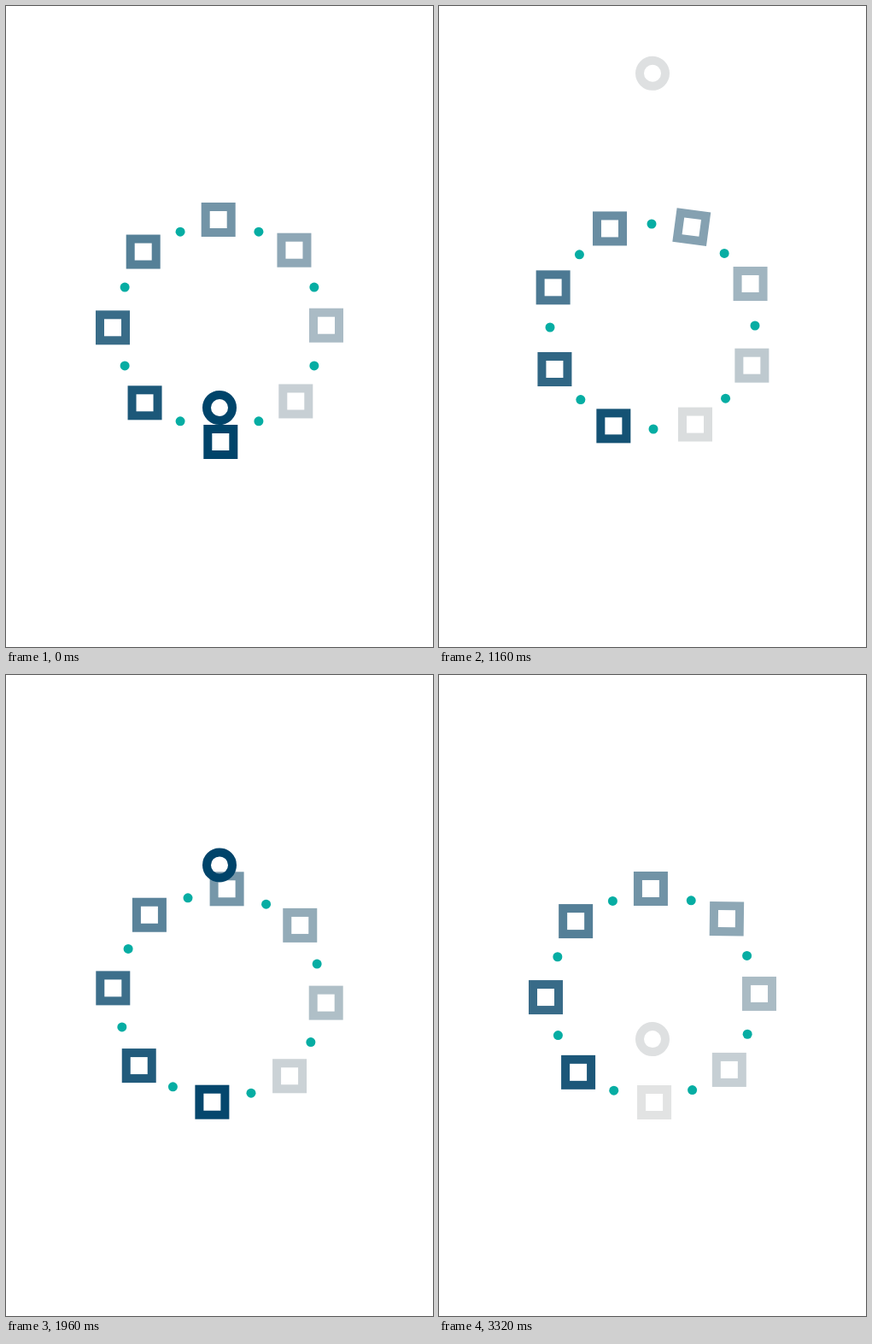
Write an HTML page that moves like this. It is 500 px wide and 750 px high and loops after 3360 ms.

```html
<!DOCTYPE html>
<html lang="en">
<head>
<meta charset="utf-8">
<title>Bouncing ball loader</title>
<style>
  html, body { margin: 0; width: 100%; height: 100%; overflow: hidden; background: #fff; }
  svg { display: block; width: 100%; height: 100%; }
</style>
</head>
<body>
<svg id="stage" viewBox="0 0 500 750"></svg>
<script>
const PERIOD = 1680, STEP = 40, COUNT = 8;
const DARK = [0, 68, 106], LIGHT = [227, 227, 227];
const APEX = 574, TOP_HIT = 755, PEAK = 1220, BOTTOM_HIT = 1660;

// Ring rotation: time, degrees, degrees per ms
const SPIN = [
  [0, 0, .009], [280, 4.55, .013], [800, 11.44, .0245], [1160, 22.02, .041],
  [1440, 37, .054], [1640, 44.65, .016], [PERIOD, 45, .006]
];

const stage = document.getElementById('stage');

function add(tag, attrs) {
  const node = document.createElementNS('http://www.w3.org/2000/svg', tag);
  set(node, attrs);
  stage.appendChild(node);
  return node;
}

function set(node, attrs) {
  for (const key in attrs) node.setAttribute(key, attrs[key]);
}

const each = make => Array.from({ length: COUNT }, make);
const dots = each(() => add('circle', { r: 5.5, fill: '#06ada3' }));
const squares = each(() => add('rect', {
  x: -15, y: -15, width: 30, height: 30, fill: 'none', 'stroke-width': 10
}));
const ball = add('circle', { cx: 250, r: 15, fill: 'none', 'stroke-width': 10 });

const clamp = x => Math.min(1, Math.max(0, x));
const mix = (a, b, x) => a + (b - a) * x;
const easeOut = (x, power) => 1 - Math.pow(1 - clamp(x), power);
const shade = x => `rgb(${DARK.map((c, i) => Math.round(mix(c, LIGHT[i], x)))})`;

function spinAt(t) {
  const i = SPIN.findIndex(key => key[0] > t);
  const [t0, a0, v0] = SPIN[i - 1], [t1, a1, v1] = SPIN[i];
  const span = t1 - t0, x = (t - t0) / span, y = 1 - x;
  return a0 * (1 + 2 * x) * y * y + v0 * span * x * y * y
       + a1 * (3 - 2 * x) * x * x - v1 * span * x * x * y;
}

function onRing(degrees, radius) {
  const a = degrees * Math.PI / 180;
  return [250 - radius * Math.sin(a), 375 + radius * Math.cos(a)];
}

function ballY(t) {
  if (t < APEX) return mix(470, 184, easeOut(t / APEX, 3));
  if (t < TOP_HIT) return mix(184, 212, ((t - APEX) / (TOP_HIT - APEX)) ** 2);
  if (t < PEAK) return mix(212, 78.5, easeOut((t - TOP_HIT) / (PEAK - TOP_HIT), 3));
  if (t < BOTTOM_HIT) return mix(78.5, 460, ((t - PEAK) / (BOTTOM_HIT - PEAK)) ** 2);
  return mix(460, 470, (t - BOTTOM_HIT) / (PERIOD - BOTTOM_HIT));
}

// Offset and tilt of a square that the ball has struck
function recoil(index, t) {
  if (index === 0) return [0, 10 * (1 - clamp(t / 200)) ** 2, 0];
  const u = t - TOP_HIT;
  if (index !== 4 || u < 0) return [0, 0, 0];
  return [
    .118 * u * Math.exp(-.0142 * u),
    .38 * u * Math.exp(-.0265 * u),
    -53.2 * Math.exp(-.0037 * u) * Math.sin(.0138 * u)
  ];
}

function draw(time) {
  const t = Math.floor(time / STEP) * STEP % PERIOD;
  const spin = spinAt(t);

  dots.forEach((dot, i) => {
    const [cx, cy] = onRing(i * 45 + 22.5 + spin, 120);
    set(dot, { cx, cy });
  });

  squares.forEach((square, i) => {
    const [x, y] = onRing(i * 45 + spin - .6, 125);
    const [dx, dy, tilt] = recoil(i, t);
    set(square, {
      transform: `translate(${x + dx} ${y + dy}) rotate(${tilt})`,
      stroke: shade((i + t / PERIOD) / COUNT)
    });
  });

  set(ball, { cy: ballY(t), stroke: shade(.98 * easeOut((t - 570) / 520, 2)) });
}

const start = performance.now();
function tick() {
  draw(performance.now() - start);
  requestAnimationFrame(tick);
}
tick();
</script>
</body>
</html>
```
